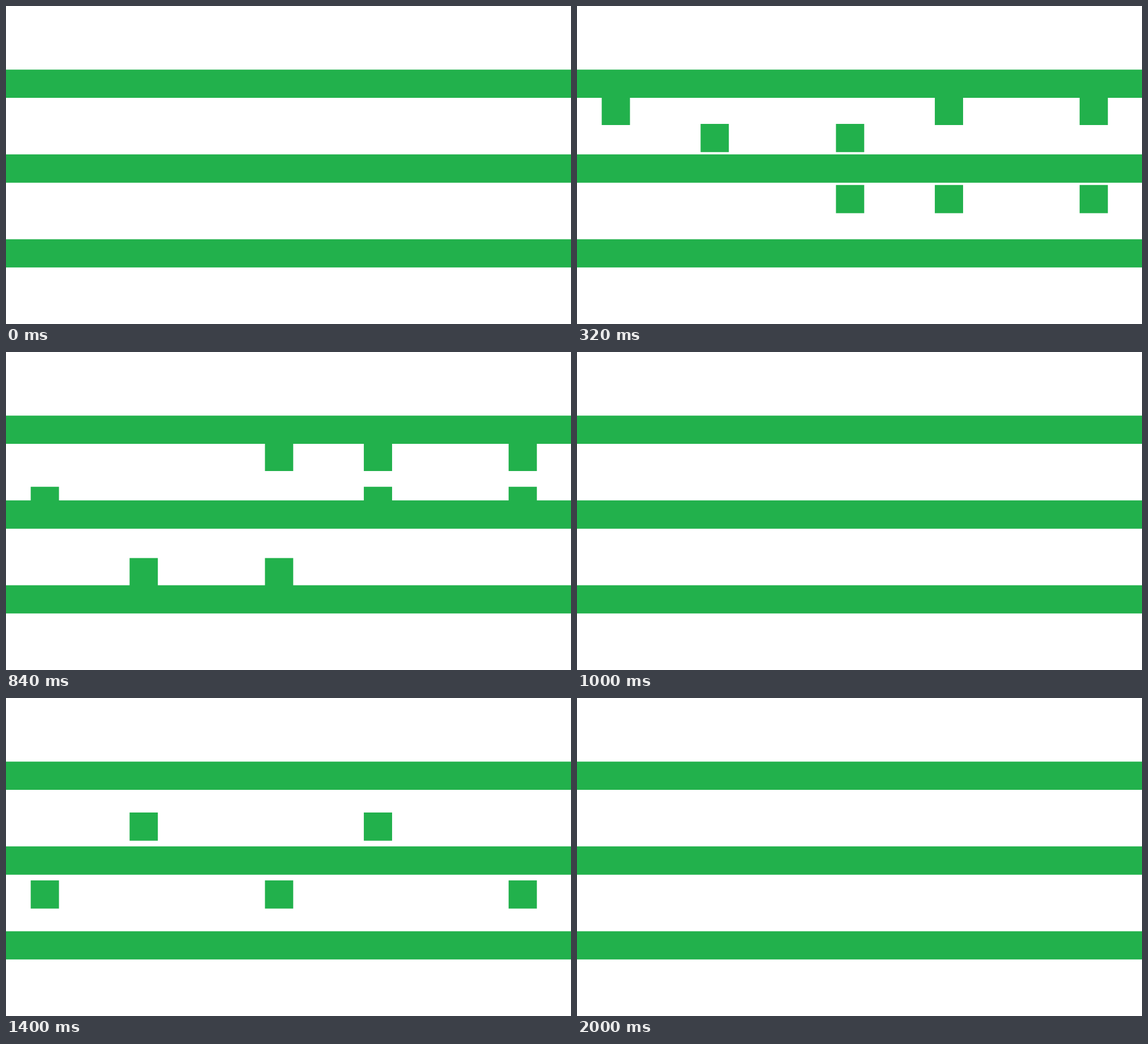
An HTML page with a canvas that plays this animation: 998 px wide and 561 px high, repeating every 3040 ms.

```html
<!DOCTYPE html>
<html lang="en">
<head>
<meta charset="utf-8">
<title>Blocks between bars</title>
<style>
  html, body { margin: 0; width: 100%; height: 100%; overflow: hidden; background: #fff; }
  canvas { display: block; }
</style>
</head>
<body>
<canvas id="stage" width="998" height="561"></canvas>
<script>
const ctx = document.getElementById("stage").getContext("2d");
const LOOP = 3040, STEP = 40, PHASE = 1000;

// The scene is laid out on a 1920 x 1080 plane and scaled to the stage.
const WIDTH = 1920, HEIGHT = 1080;
const SIZE = 96, TOP = 216, GAP = 3 * SIZE;
const COLUMNS = [84, 420, 880, 1216, 1708];
ctx.scale(998 / WIDTH, 561 / HEIGHT);

// Levels count bars from the top: 0, 1, 2.
function addBox(x, level, width = SIZE) {
  ctx.rect(x, TOP + level * GAP, width, SIZE);
}

// First all columns drop from the top bar, the right ones also rise from the bottom.
function addCrossing(x, column, progress) {
  const isLongDrop = column === 1 || column === 2;
  addBox(x, progress * (isLongDrop ? 2 : 1));
  if (column >= 2) addBox(x, 2 - 2 * progress);
}

// Then blocks leave the middle bar, alternately down and up.
function addSplit(x, column, progress) {
  addBox(x, 1 + (column % 2 ? -progress : progress));
}

function draw(time) {
  const t = Math.floor((time % LOOP) / STEP) * STEP;
  const progress = (t % PHASE) / PHASE;
  const addBlock = [addCrossing, addSplit][Math.floor(t / PHASE)];

  ctx.fillStyle = "#fff";
  ctx.fillRect(0, 0, WIDTH, HEIGHT);

  // One path for everything, so that soft edges do not add up where boxes overlap.
  ctx.beginPath();
  for (let bar = 0; bar < 3; bar++) addBox(0, bar, WIDTH);
  if (addBlock) COLUMNS.forEach((x, column) => addBlock(x, column, progress));
  ctx.fillStyle = "#22b14c";
  ctx.fill();
}

const start = performance.now();
function tick() {
  draw(performance.now() - start);
  requestAnimationFrame(tick);
}
tick();
</script>
</body>
</html>
```
